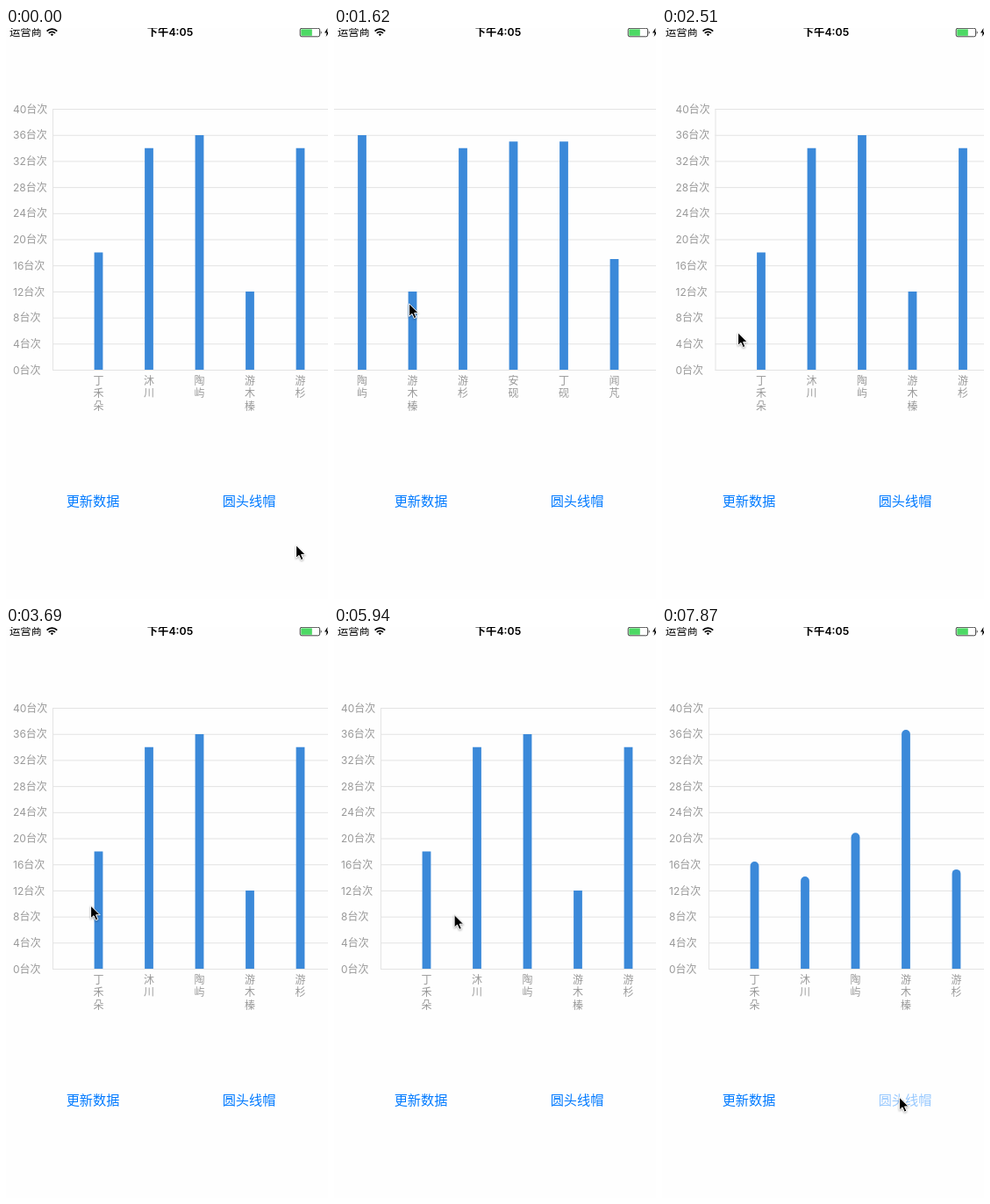
Recreate the animation shown at these times as an HTML page. Size 367 by 650 pixels, loop 8 s.

```html
<!DOCTYPE html>
<html lang="zh">
<head>
<meta charset="utf-8">
<style>
html, body { margin: 0; width: 100%; height: 100%; overflow: hidden; background: #fefefe; }
svg { display: block; font: 12px Inter, "Noto Sans CJK SC", "Noto Sans CJK", sans-serif; }
.mid { text-anchor: middle; }
.status { font-size: 12.3px; }
.chart { fill: #999; }
.grid { fill: #e3e3e3; }
.button { font-size: 15.2px; fill: #007aff; }
#bars { stroke: #3b89d9; stroke-width: 9.8; }
</style>
</head>
<body>
<svg width="367" height="650" viewBox="0 0 367 650">
  <clipPath id="plot"><rect width="900" height="389"/></clipPath>
  <text class="status" x="4" y="9.4">运营商</text>
  <g fill="none" stroke="#000" stroke-width="1.8">
    <path d="M46.6 3.7a8 8 0 0 1 11.6 0M48.8 6a5 5 0 0 1 7.2 0"/>
    <path d="M50.7 7.3a2.4 2.4 0 0 1 3.4 0L52.4 9.3z" fill="#000" stroke="none"/>
  </g>
  <text class="mid status" x="187" y="9.4" font-weight="600">下午4:05</text>
  <rect x="335.2" y=".3" width="22.4" height="9.5" rx="1.8" fill="none" stroke="#444"/>
  <rect x="336.3" y="1.4" width="12.5" height="7.4" fill="#4cd964"/>
  <path d="M358.8 3.3q1.6 1.8 0 3.6zM366.5 0l-3.5 5.4h2.6L364.6 10l4-5.6h-2.6z"/>
  <g id="chart" class="chart">
    <g id="grid" class="grid"></g>
    <g id="bars" clip-path="url(#plot)"></g>
  </g>
  <text class="mid button" id="update" x="99" y="544.3">更新数据</text>
  <text class="mid button" id="caps" x="277" y="544.3">圆头线帽</text>
  <path id="cursor" d="M.6.8V15.4L4 12.3l2.3 5.3 2.6-1.1-2.3-5.1h4.6z" stroke="#fff"
    style="filter:drop-shadow(0 1px 1px #0005)"/>
</svg>
<script>
const LOOP = 8000, STEP = 148.5, LAG = 28;
const TOP = 92, ROW = 29.7, BASE = 389.2, UNIT = ROW / 4, GAP = 57.5;
const MAX_SCROLL = 188.5;
const $ = id => document.getElementById(id);
const clamp = (v, lo, hi) => Math.min(hi, Math.max(lo, v));
const mix = (a, b, p) => a + (b - a) * p;
const part = (from, to, v) => clamp((v - from) / (to - from), 0, 1);
const smooth = p => p * p * (3 - 2 * p);

function add(parent, tag, attrs, text = "") {
  const el = document.createElementNS("http://www.w3.org/2000/svg", tag);
  for (const name in attrs) el.setAttribute(name, attrs[name]);
  el.textContent = text;
  return parent.appendChild(el);
}

const people = [
  { name: "丁禾朵", first: 18, next: 15.8 },
  { name: "沐川", first: 34, next: 13.5 },
  { name: "陶屿", first: 36, next: 20.2 },
  { name: "游木榛", first: 12, next: 36 },
  { name: "游杉", first: 34, next: 14.6 },
  { name: "安砚", first: 35, next: 24 },
  { name: "丁砚", first: 35, next: 9 },
  { name: "闻芃", first: 17, next: 28 }
];

for (let i = 0; i <= 10; i++) {
  const y = TOP + ROW * i;
  add($("grid"), "rect", { x: 53, y, width: 700, height: 1 });
  add($("chart"), "text", { x: 8, y: y + 4.6 }, 40 - 4 * i + "台次");
}
add($("grid"), "rect", { x: 53, y: TOP, width: 1, height: 298 });

const bars = people.map(({ name }, i) => {
  const x = 105.5 + GAP * i;
  [...name].forEach((char, row) =>
    add($("chart"), "text", { class: "mid", x, y: 405.7 + 14.5 * row }, char));
  return add($("bars"), "line", { x1: x, x2: x, y1: BASE });
});

// Pointer moves as [first step, last step, x, y]; it rests in between.
const moves = [
  [0, 3, 289, 330], [3, 6, 105, 308], [6, 8, 85, 313],          // drag left
  [11, 14, 210, 320], [14, 17, 86, 346], [17, 22, 90, 356],     // flick back
  [24, 27, 108, 237], [27, 31, 144, 344], [31, 33, 161, 344],   // wander
  [35, 38, 185, 118], [38, 42, 88, 535.5],                      // first button
  [46, 48, 190, 549], [48, 51, 270, 534.5]                      // second button
];

function pointerAt(step) {
  let x = 330, y = 588;
  for (const [from, to, toX, toY] of moves) {
    const p = part(from, to, step);
    x = mix(x, toX, p);
    y = mix(y, toY, p);
  }
  return { x, y };
}

function scrollAt(step, x) {
  if (step <= 11) return clamp(279 - x, 0, MAX_SCROLL);
  if (step <= 15) return MAX_SCROLL * (1 - smooth(part(11, 15, step)));
  return -20 * .375 ** (step - 16);
}

function draw(now) {
  // The picture refreshes only once per step.
  const step = Math.floor((now % LOOP + LAG) / STEP);
  const { x, y } = pointerAt(step);
  $("cursor").setAttribute("transform", `translate(${x} ${y})`);
  $("chart").setAttribute("transform", `translate(${-scrollAt(step, x)} 0)`);

  const updated = step >= 44, round = step >= 53;
  const grow = updated ? part(43.5, 47, step) : 1;
  bars.forEach((bar, i) => {
    const { first, next } = people[i];
    bar.setAttribute("y2", BASE - (updated ? next : first) * UNIT * grow);
  });
  $("bars").setAttribute("stroke-linecap", round ? "round" : "butt");
  $("update").setAttribute("opacity", step < 43 ? 1 : 1 - .6 * .4 ** (step - 43));
  $("caps").setAttribute("opacity", round ? .4 : 1);
  requestAnimationFrame(() => draw(performance.now()));
}
draw(0);
</script>
</body>
</html>
```
